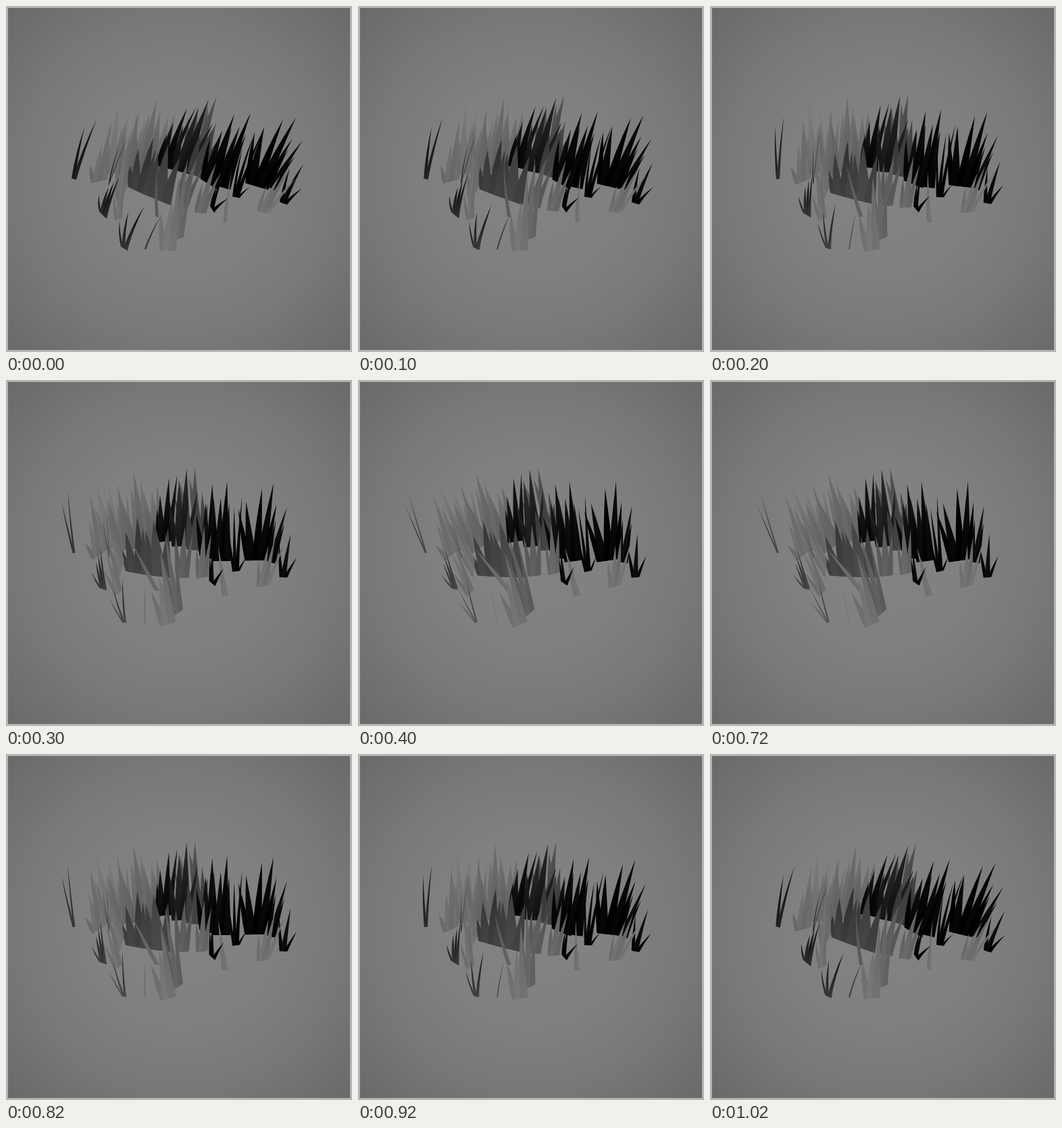
An HTML page with a canvas that plays this animation: 512x512 px, repeating every 1.12 s.

```html
<!DOCTYPE html>
<html lang="en">
<head>
<meta charset="utf-8">
<title>Grass in the wind</title>
<style>
  html, body { margin: 0; width: 100%; height: 100%; overflow: hidden; }
  body {
    box-sizing: border-box;
    border: 3px solid #b3b6b3;
    background: radial-gradient(circle at 50% 50%, #838383 0, #808080 38%, #787878 66%, #696969 100%);
  }
  canvas { position: fixed; left: 0; top: 0; width: 512px; height: 512px; }
</style>
</head>
<body>
<canvas id="stage" width="512" height="512"></canvas>
<script>
const ctx = document.getElementById('stage').getContext('2d');
const LOOP = 1120;
const SWAY = [0, .13, .36, .62, .87, .985];
const tufts = [];
const mix = (a, b, t) => a + (b - a) * t;
const gray = v => {
  const g = Math.round(Math.max(0, Math.min(255, v)));
  return `rgb(${g},${g},${g})`;
};

// turn: degrees at full sway; thin: share of width lost; tip, base: shades; shift: shade change.
// outline: left and right end of the base, then the blade tips.
function tuft(turn, thin, tip, base, shift, outline, pivot) {
  const [left, right, ...tips] = outline.split(' ').map(p => p.split(',').map(Number));
  const mid = [(left[0] + right[0]) / 2, (left[1] + right[1]) / 2];
  tufts.push({ turn, thin, tip, base, shift, left, right, tips, mid, pivot: pivot || mid });
}

// pale back row
tuft(-33, 0, 112, 106, 2, '126,262 150,257 125,234 142,205 157,170 163,186');
tuft(-31, 0, 119, 108, 0, '148,248 174,246 152,180 166,146 173,178 182,158');
tuft(-31, 0, 114, 100, 0, '166,252 190,248 177,170 188,180 198,152 207,168');
tuft(-30, 0, 112, 98, 0, '186,246 216,242 193,160 213,158 224,135 230,151');
tuft(-29, 0, 114, 92, 0, '212,243 240,240 228,160 240,164 250,158');

// dark middle
tuft(-28, 0, 88, 58, 2, '262,236 300,238 270,165 284,150 312,133 299,146 311,172');
tuft(-27, 0, 22, 4, 4, '222,236 246,242 238,190 248,172 268,151 281,150');
tuft(-27, 0, 40, 16, 6, '246,242 276,250 262,176 285,151 300,138 306,174');
tuft(-28, 0, 58, 62, 4, '268,246 296,258 288,190 306,182 318,192');
tuft(-28, 0, 14, 0, 8, '288,256 314,272 302,196 320,184 338,160 334,180');
tuft(-28, 0, 10, 0, 6, '306,264 332,272 330,196 346,178 362,158 355,190');

// black right side
tuft(-28, 0, 8, 0, 4, '335,282 346,284 350,210 366,192 382,180 361,268');
tuft(-28, 0, 6, 0, 4, '354,262 388,272 368,186 382,179 410,168 429,165 424,196');
tuft(-28, 0, 12, 2, 6, '386,266 398,274 418,212 439,199 428,222');
tuft(-28, 0, 12, 2, 8, '405,290 416,294 420,240 440,234 438,270');
tuft(-28, 0, 104, 112, 2, '371,304 390,307 386,266 406,250 419,242 430,254');

// centre clump turns as one
const hub = [237, 290];
tuft(-24, 0, 48, 62, 8, '181,268 214,283 184,236 196,211 218,195 222,212', hub);
tuft(-24, 0, 58, 66, 8, '212,282 244,295 225,216 240,205 258,222', hub);
tuft(-24, 0, 84, 92, 2, '250,296 269,301 266,236 283,226 291,240', hub);
tuft(-24, 0, 92, 104, 0, '279,305 296,307 291,262 311,232 318,246', hub);

tuft(-28, -1.1, 108, 112, 0, '322,319 327,321 330,270 334,246');
tuft(-28, 0, 8, 0, 6, '302,296 308,306 314,262 322,250 328,285');

// left side
tuft(-35, .1, 106, 112, 0, '163,292 180,268 164,226 176,208 184,192');
tuft(-36, .7, 16, 34, 42, '151,266 155,258 168,206 185,185');
tuft(-37, .75, 12, 28, 40, '97,255 104,257 116,180 134,168');
tuft(-35, -.4, 106, 112, 0, '161,317 172,314 160,276 172,250 180,240');
tuft(-40, .35, 4, 40, 34, '138,304 149,315 138,280 152,268 160,260 168,252');
tuft(-38, .7, 4, 50, 38, '170,356 180,362 168,318 181,305 204,297 195,316');

// front
tuft(-45, -.5, 84, 92, 24, '221,311 226,313 224,232');
tuft(-34, .7, 36, 62, 70, '205,359 207,361 230,309');
tuft(-26, 0, 98, 104, -12, '247,347 263,342 256,252 269,225 279,241');
tuft(-25, 0, 108, 118, -4, '228,362 252,362 229,306 246,290 258,254');

function blade(a, b, tip, bend) {
  const edge = (p, out) => [
    mix(p[0], tip[0], .48) + out - bend,
    mix(p[1], tip[1], .48)
  ];
  const bulge = Math.abs(b[0] - a[0]) * .14;
  const l = edge(a, -bulge), r = edge(b, bulge);
  ctx.beginPath();
  ctx.moveTo(...a);
  ctx.quadraticCurveTo(...l, ...tip);
  ctx.quadraticCurveTo(...r, ...b);
  ctx.closePath();
  ctx.fill();
}

function drawTuft(t, sway) {
  const { left, right, tips, mid, pivot } = t;
  const width = 1 - t.thin * sway;
  const along = u => [0, 1].map(i => mid[i] + (mix(left[i], right[i], u) - mid[i]) * width);
  const top = Math.min(...tips.map(p => p[1]));
  const n = tips.length;

  ctx.save();
  ctx.translate(...pivot);
  ctx.rotate(t.turn * sway * Math.PI / 180);
  ctx.translate(-pivot[0], -pivot[1]);
  tips.forEach((tip, k) => {
    const tone = t.shift * sway + (k % 2 ? 3 : -3);
    const fill = ctx.createLinearGradient(0, top, 0, mid[1]);
    fill.addColorStop(0, gray(t.tip + tone));
    fill.addColorStop(1, gray(t.base + tone));
    ctx.fillStyle = fill;
    const a = along(Math.max(0, (k - .5) / n));
    const b = along(Math.min(1, (k + 1.5) / n));
    const x = mix(mid[0], tip[0], mix(1, width, .4));
    blade(a, b, [x, tip[1]], 3 * (1 - sway));
  });
  ctx.restore();
}

// the sixth pose is held a little longer
function stepAt(ms) {
  return ms < 500 ? Math.floor(ms / 100) : ms < 620 ? 5 : 6 + Math.floor((ms - 620) / 100);
}

function frame() {
  const step = stepAt(performance.now() % LOOP);
  const sway = step === 6 ? 1 : SWAY[Math.min(step, 11 - step)];
  ctx.clearRect(0, 0, 512, 512);
  tufts.forEach(t => drawTuft(t, sway));
  requestAnimationFrame(frame);
}
frame();
</script>
</body>
</html>
```
